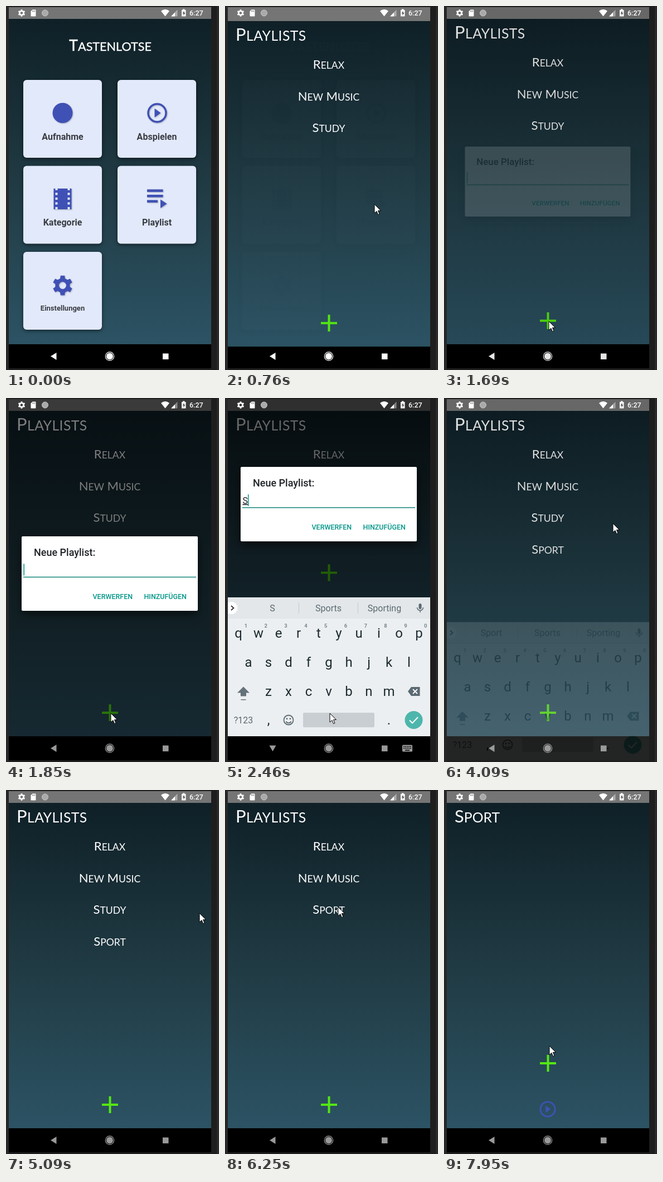
Recreate the animation shown at these times as an HTML page. Size 382 px wide and 650 px high, loop 8 s.

```html
<!DOCTYPE html>
<html lang="de">
<head>
<meta charset="utf-8">
<title>Playlists</title>
<style>
  html, body { margin: 0; width: 382px; height: 650px; overflow: hidden; background: #1e1e1e; }
  svg { display: block; }
  text { font-family: Roboto, sans-serif; white-space: pre; }
  .caps { font-family: Lato, sans-serif; fill: #fff; }
  .mid { text-anchor: middle; }
  .label { font-weight: 700; fill: #393c42; text-anchor: middle; }
  .card { fill: #e2e9fb; filter: drop-shadow(0 2px 3px #0008); }
  .icon { fill: #3f51b5; filter: drop-shadow(1px 1px 1px #0004); }
  .button { font-size: 12.5px; font-weight: 500; fill: #009688; }
  .key { font-size: 24px; fill: #1c2b30; text-anchor: middle; }
  .hint { font-size: 9.5px; font-weight: 700; fill: #7b878d; text-anchor: middle; }
  .soft { font-size: 16px; fill: #5b6a72; text-anchor: middle; }
  #dialog { transform-box: fill-box; transform-origin: center; }
</style>
</head>
<body>
<script>
const LOOP = 8000;
const clamp = v => Math.max(0, Math.min(1, v));
const ramp = (t, a, b) => clamp((t - a) / (b - a));
const rect = (x, y, w, h, fill, more = '') =>
  `<rect x="${x}" y="${y}" width="${w}" height="${h}" fill="${fill}" ${more}/>`;
const text = (s, x, y, cls, more = '') => `<text x="${x}" y="${y}" class="${cls}" ${more}>${s}</text>`;

// Capitals with smaller capitals for the lower-case letters
const caps = (s, x, y, size, cls = '', more = '') =>
  text(s.replace(/[a-z]+/g, m => `<tspan font-size="${size * .8}">${m.toUpperCase()}</tspan>`),
    x, y, 'caps ' + cls, `font-size="${size}" ${more}`);

function gear(cx, cy, r) {
  const points = [];
  for (let k = 0; k < 6; k++)
    for (const [d, q] of [[-19, .74], [-12, 1], [12, 1], [19, .74]]) {
      const a = (k * 60 + 90 + d) * Math.PI / 180;
      points.push((cx + r * q * Math.cos(a)).toFixed(2) + ' ' + (cy + r * q * Math.sin(a)).toFixed(2));
    }
  const h = r * .36;
  return `<path fill-rule="evenodd" stroke-linejoin="round"
    d="M${points.join('L')}ZM${cx - h} ${cy}a${h} ${h} 0 1 0 ${2 * h} 0a${h} ${h} 0 1 0 ${-2 * h} 0Z"/>`;
}

const playIcon = (x, y, k) => `<g transform="translate(${x} ${y}) scale(${k})">
  <circle r="16" fill="none" stroke="#3f51b5" stroke-width="3.5"/><path d="M-4.500-8L6.500 0L-4.500 8Z"/></g>`;
const plus = (id, y) => `<path id="${id}" d="M172 ${y}h29M186.500 ${y - 15}v30" stroke="#54e712" stroke-width="4"/>`;

const page = (id, body) => `<g id="${id}">
  ${rect(5, 2, 363, 21, '#757575')}${rect(5, 23, 363, 680, '#000')}
  ${rect(5, 23, 363, 581, 'url(#sky)', `id="${id}Sky"`)}${body}</g>`;

const card = (x, y, h, name, size, icon) =>
  rect(x, y, 141, h, '', 'rx="6" class="card"') + `<g class="icon">${icon}</g>` +
  text(name, x + 70.5, y + (size < 16 ? 105 : 106.500), 'label', `font-size="${size}"`);

const film = () => {
  let s = rect(85.500, 326, 32, 37, '#3f51b5');
  for (let i = 0; i < 5; i++)
    for (const x of [88.500, 110.500]) s += rect(x, 325 + i * 8.500, 4, 4, '#e2e9fb');
  return s;
};

const home = page('home',
  caps('Tastenlotse', 187, 80, 27, 'mid', 'stroke="#fff" stroke-width=".4"') +
  card(31, 132, 139, 'Aufnahme', 16, '<circle cx="101.500" cy="191" r="18"/>') +
  card(200, 132, 139, 'Abspielen', 16, playIcon(271, 191, 1)) +
  card(31, 285.500, 139, 'Kategorie', 16, film()) +
  card(200, 285.500, 139, 'Playlist', 16,
    '<path d="M253 327.500h28.500v4.500h-28.500zM253 337h28.500v4.500h-28.500zM253 346.500h19v4.500h-19zM277 345.500l11.500 7.500-11.500 8z"/>') +
  card(31, 439, 139, 'Einstellungen', 13, gear(101.500, 499, 18)));

const item = (s, i, id = '') => caps(s, 186, 108 + i * 56.500, 22, 'mid', id && `id="${id}"`);
const list = page('list',
  caps('Playlists', 19, 58, 31, '', 'letter-spacing=".4"') + item('Relax', 0) + item('New Music', 1) +
  item('Study', 2, 'study') + item('Sport', 3, 'sport') + plus('add', 562));

const detail = page('detail', caps('Sport', 19, 58, 31) + plus('addSong', 488) +
  `<g fill="#3f51b5">${playIcon(186, 570, .82)}</g>`);

const dialog = `<g id="dialogPos"><g id="dialog">
  ${rect(28, 247, 316, 133, '#fff', 'rx="2" style="filter:drop-shadow(0 6px 8px #0009)"')}
  ${text('Neue Playlist:', 50, 282, '', 'font-size="18" font-weight="500" fill="#1f2326"')}
  ${text('', 31.500, 312.500, '', 'id="field" font-size="16" fill="#222" text-decoration="underline"')}
  ${rect(31, 319, 310, 1.500, '#17897c')}${rect(31.500, 296, 1.500, 21, '#009688', 'id="caret"')}
  ${text('VERWERFEN', 155.500, 359, 'button')}${text('HINZUFÜGEN', 247.500, 359, 'button')}
</g></g>`;

const row = (keys, x, y) => [...keys].map((c, i) => text(c, x + 36 * i, y, 'key')).join('');
const keyboard = `<g id="keyboard">
  ${rect(5, 356, 363, 38, '#e3e7e9')}${rect(5, 394, 363, 210, '#eceff1')}
  <circle cx="11.500" cy="375" r="11" fill="#fff"/>
  <path d="M11 371l4.500 4-4.500 4" fill="none" stroke="#333" stroke-width="1.800"/>
  ${[85, 185.500, 286].map((x, i) => text('', x, 381, 'soft', `id="hint${i}"`)).join('')}
  ${rect(132, 365, 1, 20, '#c3cacd')}${rect(238, 365, 1, 20, '#c3cacd')}
  ${rect(347.500, 367, 5, 10, '#5b6a72', 'rx="2.500"')}
  <path d="M344.500 374a5.500 5.500 0 0 0 11 0M350 379.500v3.500" fill="none" stroke="#5b6a72" stroke-width="1.500"/>
  ${row('qwertyuiop', 24, 428)}${row('asdfghjkl', 42, 480)}${row('zxcvbnm', 78, 532)}
  ${[...'1234567890'].map((c, i) => text(c, 37.500 + 35.800 * i, 410, 'hint')).join('')}
  <path d="M33 515.500l11 11h-6v6h-10v-6h-6zM28.500 538h9v1.500h-9z" fill="#64727a"/>
  <path d="M328 524l6-8h15.500v16H334z" fill="#5b6a72"/>
  <path d="M337 520l8 8M345 520l-8 8" stroke="#fff" stroke-width="1.800"/>
  ${text('?123', 33, 581, 'soft')}${text(',', 78, 583, 'key')}${text('.', 294, 583, 'key')}
  <g fill="none" stroke="#5b6a72" stroke-width="1.800"><circle cx="114" cy="575" r="8.500"/>
    <path d="M109.500 577.500a5 5 0 0 0 9 0"/></g>
  <path d="M109.800 571.500h2.500v2.500h-2.500zM115.700 571.500h2.500v2.500h-2.500z" fill="#5b6a72"/>
  ${rect(140, 562, 128, 26, '#c9ced2', 'rx="2"')}
  <circle cx="338.500" cy="575" r="16" fill="#4db6ac"/>
  <path d="M331 575.500l5 5 10-10.500" fill="none" stroke="#fff" stroke-width="2"/>
</g>`;

const statusIcons = `<g fill="#fff">${gear(28, 12.500, 6.500)}
  <path d="M47.500 6.500h5q1 0 1 1v10q0 1-1 1h-7q-1 0-1-1v-8z"/>
  <path d="M47.500 8v2.500M49.500 8v2.500M51.500 8v2.500" stroke="#777"/>
  <circle cx="70" cy="12.500" r="5.500" fill="#aaa" stroke="#c8c8c8"/>
  <path d="M285.500 18.500L278 9q7.500-6 15 0z"/>
  <path d="M296 18.500h11.500v-12z" opacity=".4"/><path d="M296 18.500h7v-7z"/>
  <path d="M317 5.500h3.500v1.500h2v11.500h-7.500v-11.500h2z"/>
  <path d="M319.500 8.500l-3 5h2v3.500l3-5h-2z" fill="#555"/>
  ${text('6:27', 329, 17, '', 'font-size="12.500" font-weight="500"')}</g>`;

const navIcons = `<g id="nav">
  <path id="back"/><circle cx="186" cy="625.500" r="6"/>
  <circle cx="186" cy="625.500" r="7.700" fill="none" stroke="currentColor" stroke-width="1.200"/>
  <path d="M281 620.500h10.500v10.500h-10.500z"/>
  <g id="switcher">${rect(318, 619.500, 18, 12, 'currentColor', 'rx="1.500"')}
    <path d="M320 622.500h14M320 625.500h14" stroke="#000" stroke-width="1.500" stroke-dasharray="2 1"/>
    <path d="M323 629h8" stroke="#000" stroke-width="1.500"/></g></g>`;

document.body.innerHTML = `<svg width="382" height="650">
  <defs><linearGradient id="sky" x2="0" y2="1"><stop stop-color="#0f2027"/>
    <stop offset=".5" stop-color="#203a43"/><stop offset="1" stop-color="#2c5364"/></linearGradient>
    <clipPath id="screen">${rect(5, 2, 363, 645, '#000')}</clipPath></defs>
  ${rect(0, 0, 5, 650, '#272727')}${rect(378, 0, 4, 650, '#292929')}
  <g clip-path="url(#screen)">${home}${list}${detail}
    ${rect(5, 2, 363, 645, '#000', 'id="dim"')}${dialog}${keyboard}${statusIcons}${navIcons}</g>
  <path id="mouse" d="M0 0V16L4 12.500L6.500 18.500L9 17.500L6.500 11.500H11.500Z" fill="#fff" stroke="#000"/>
</svg>`;

const $ = id => document.getElementById(id);
const set = (id, attrs) => { for (const k in attrs) $(id).setAttribute(k, attrs[k]); };
const show = (id, on) => set(id, { visibility: on ? 'visible' : 'hidden' });

// time, x, y of the pointer tip
const path = [[0, 276, 690], [70, 275, 635], [220, 271, 440], [380, 268, 354], [880, 268, 354],
  [1380, 188, 563], [2960, 188, 563], [3240, 313, 243], [3390, 303, 224], [4280, 303, 224],
  [4480, 287, 226], [4750, 325, 203], [5090, 347, 220], [5130, 347, 220], [5400, 98, 213],
  [5660, 98, 213], [5800, 60, 218], [6100, 229, 200], [6250, 203, 209], [6480, 176, 208],
  [7640, 176, 208], [7950, 189, 457], [LOOP, 189, 457]];

function pointer(t) {
  const i = path.findIndex(p => p[0] > t);
  const [a, b] = [path[i - 1], path[i]];
  const p = ramp(t, a[0], b[0]);
  return [1, 2].map(k => a[k] + (b[k] - a[k]) * p);
}

// A new screen fades in while rising into place
function enter(id, t, start) {
  const rise = 46 * (1 - ramp(t, start, start + 350)) ** 5;
  set(id, { opacity: 1 - (1 - ramp(t, start, start + 200)) ** 4, transform: `translate(0 ${rise})` });
}

function draw(t) {
  enter('list', t, 628);
  enter('detail', t, 7588);

  const small = t >= 2080 && t < 4000;
  set('listSky', { height: small ? 333 : 581 });
  set('add', { transform: `translate(0 ${small ? -250 : 0})` });
  const removed = t >= 5710;
  show('study', !removed);
  show('sport', t >= 3930);
  set('sport', { transform: `translate(0 ${removed ? -56.5 : 0})` });

  set('dim', { opacity: .6 * ramp(t, 1640, 1890) * (1 - ramp(t, 3930, 4130)) });
  const grow = 1 - .1 * (1 - ramp(t, 1670, 1890)) ** 5;
  set('dialogPos', {
    opacity: ramp(t, 1670, 1820) * (1 - ramp(t, 3900, 4050)),
    transform: `translate(0 ${-124 * (1 - (1 - ramp(t, 2080, 2300)) ** 3)})`
  });
  $('dialog').style.transform = `scale(${grow})`;

  const shown = 1 - (1 - ramp(t, 2050, 2260)) ** 2;
  const gone = ramp(t, 3955, 4115);
  set('keyboard', { opacity: shown * (1 - gone), transform: `translate(0 ${52 * (1 - shown + gone)})` });

  const count = Math.max(0, Math.min(5, Math.floor((t - 2460) / 79) + 1));
  const typed = 'Sport'.slice(0, count);
  $('field').textContent = typed;
  [typed, count ? 'Sports' : '', count ? 'Sporting' : ''].forEach((s, i) => $('hint' + i).textContent = s);
  set('caret', { x: 31.5 + (count ? $('field').getComputedTextLength() : 0) });
  show('caret', t < 3010 || t >= 3550);

  const grey = Math.round(255 - 101 * ramp(t, 1640, 1850));
  const color = `rgb(${grey},${grey},${grey})`;
  set('nav', { fill: color, color });
  set('back', { d: small ? 'M79.500 620.500h12l-6 10.500z' : 'M80 625.500l10.500-6.500v13z' });
  show('switcher', small);

  set('mouse', { transform: `translate(${pointer(t)})` });
}

function tick() {
  draw(performance.now() % LOOP);
  requestAnimationFrame(tick);
}
tick();
</script>
</body>
</html>
```
